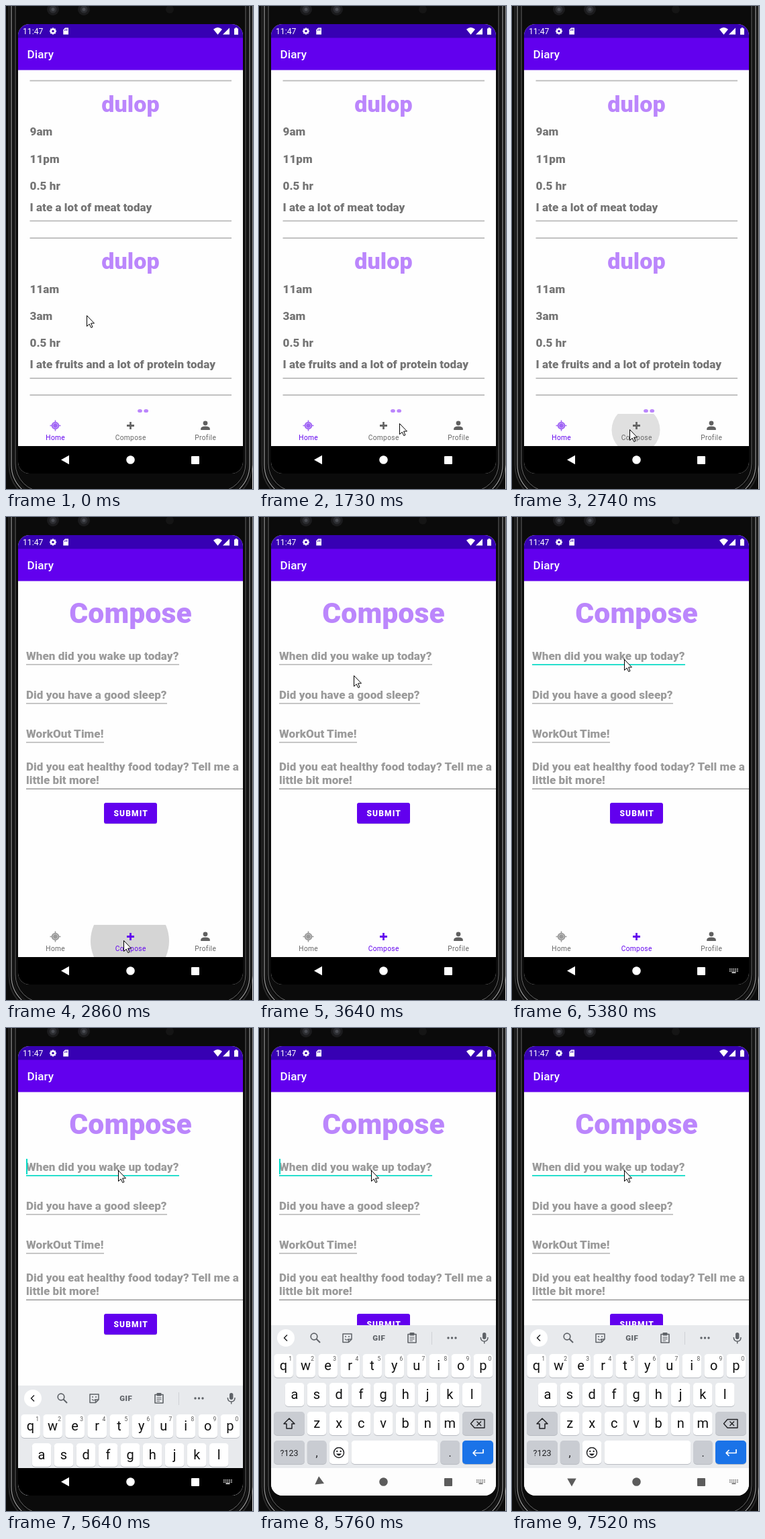
Recreate the animation shown at these times as an HTML page. Size 368 by 720 pixels, loop 8000 ms.

```html
<!DOCTYPE html>
<html lang="en">
<head>
<meta charset="utf-8">
<title>Diary app</title>
<style>
html, body { margin: 0; width: 368px; height: 720px; overflow: hidden; background: #000; }
svg { display: block; font-family: Roboto, sans-serif; }
.bold { font-weight: 900; letter-spacing: .002em; }
.mid { text-anchor: middle; }
.line { fill: none; stroke-linejoin: round; }
</style>
</head>
<body>
<svg id="stage" width="368" height="720" viewBox="0 0 368 720"></svg>
<script>
const LOOP = 8000;
const PURPLE = '#6200ee', LILAC = '#bb86fc', TEAL = '#03dac5', INK = '#5f6368';
const BODY = 17.05; // 20sp at this screen's density

const rect = (x, y, w, h, fill, r = 0, extra = '') =>
  `<rect x="${x}" y="${y}" width="${w}" height="${h}" rx="${r}" fill="${fill}" ${extra}/>`;
const disc = (x, y, r, fill, extra = '') => `<circle cx="${x}" cy="${y}" r="${r}" fill="${fill}" ${extra}/>`;
const text = (s, x, y, size, fill, cls = '', extra = '') =>
  `<text x="${x}" y="${y}" font-size="${size}" fill="${fill}" class="${cls}" ${extra}>${s}</text>`;
const path = (d, fill, extra = '') => `<path d="${d}" fill="${fill}" ${extra}/>`;
const line = (d, color, width = 1.5) => `<path d="${d}" class="line" stroke="${color}" stroke-width="${width}"/>`;
const group = (id, body, extra = '') => `<g id="${id}" ${extra}>${body}</g>`;

function phone() {
  const ring = (x, bottom, r, color, width) =>
    rect(x, -90, 371 - 2 * x, bottom + 90, 'none', r, `stroke="${color}" stroke-width="${width}"`);
  const lens = x => disc(x, 5, 9, '#1b1b1d') + disc(x, 5, 5.5, '#2d2e32') + disc(x, 5, 2.5, '#4a4c52');
  return rect(0, 0, 368, 720, '#0b0b0b') + rect(367, 0, 1, 720, '#ddd') +
    ring(4.5, 740, 56, '#2b2b2b', 2) + ring(8, 734, 50, '#999', 1.2) +
    ring(11, 730, 46, '#161616', 3) + ring(14, 724, 42, '#666', 1) +
    lens(70) + lens(116) + disc(244, 5, 6, '#151515');
}

function statusBar() {
  const teeth = [0, 45, 90, 135].map(a =>
    rect(68.8, 32.5, 2.4, 10, '#fff', .5, `transform="rotate(${a} 70 37.5)"`)).join('');
  return rect(18, 27, 335, 21, '#3700b3') + rect(18, 47.5, 335, 48, PURPLE) +
    text('11:47', 25, 42, 12.2, '#fff') +
    teeth + disc(70, 37.5, 3.8, '#fff') + disc(70, 37.5, 1.7, '#3700b3') +
    path('M88 32.5H93V42.5H85.3V35.5Z', '#fff') +
    path('M87.3 35v2M89.2 34v3M91 34v3', 'none', 'stroke="#3700b3" stroke-width=".8"') +
    path('M309 34.7Q315.5 29.5 322 34.7L315.5 42.7Z', '#fff') +
    path('M323 42.5L333 32.5V42.5Z', '#fff') +
    path('M340 33.5H341.6V32.3H344.4V33.5H346V42.7H340Z', '#fff') +
    text('Diary', 31.5, 78, BODY, '#fff', '', 'font-weight="500" letter-spacing=".1"');
}

function entry(top, rows) {
  const at = [82.5, 123, 163, 195];
  return rect(35.5, top, 300.5, 1.8, '#bbb') + rect(35.5, top + 209, 300.5, 1.8, '#bbb') +
    text('dulop', 185.5, top + 47, 34.1, LILAC, 'bold mid') +
    rows.map((s, i) => text(s, 35.5, top + at[i], BODY, '#757575', 'bold')).join('');
}

function home() {
  return entry(110.5, ['9am', '11pm', '0.5 hr', 'I ate a lot of meat today']) +
    entry(345, ['11am', '3am', '0.5 hr', 'I ate fruits and a lot of protein today']) +
    rect(35.5, 579, 300.5, 1.8, '#bbb') +
    [199.5, 208.7].map(x => `<ellipse cx="${x}" cy="603.5" rx="3.4" ry="2.6" fill="${LILAC}"/>`).join('');
}

function compose() {
  const hint = (s, y, id = '') => text(s, 30, y, BODY, '#9b9b9b', 'bold', id && `id="${id}"`);
  return text('Compose', 185.5, 157.5, 42.7, LILAC, 'bold mid') +
    hint('When did you wake up today?', 213, 'hint') +
    text('', 30, 213, BODY, '#222', 'bold', 'id="typed"') +
    hint('Did you have a good sleep?', 271) + hint('WorkOut Time!', 329) +
    hint('Did you eat healthy food today? Tell me a', 378) + hint('little bit more!', 398) +
    rect(30, 219.3, 228, 1.3, '#aaa', 0, 'id="underline"') + rect(30, 277.3, 210, 1.3, '#aaa') +
    rect(30, 335.3, 116, 1.3, '#aaa') + rect(30, 404.7, 323, 1.1, '#777') +
    rect(146, 427, 79, 31, '#ddd', 3) + rect(146, 426, 79, 31, PURPLE, 3) +
    text('SUBMIT', 186.2, 446, 12, '#fff', 'mid', 'font-weight="900" letter-spacing="1.1"') +
    rect(30, 195, 2, 23, TEAL, 0, 'id="caret"');
}

function tabs() {
  const label = (s, x) => text(s, x, 647.2, 10.2, 'currentColor', 'mid', 'letter-spacing=".36"');
  const target = '<g id="target">' + disc(73.5, 625.5, 5.8, 'currentColor') +
    line('M73.5 617.5V633.5M65.5 625.5H81.5', 'currentColor', 1.6) +
    disc(73.5, 625.5, 3.7, 'none', 'stroke="#fff" stroke-width=".7" stroke-opacity=".6"') + '</g>';
  return group('tabHome', target + label('Home', 73.7)) +
    group('tabCompose', line('M185.5 620V631M180 625.5H191', 'currentColor', 2.8) + label('Compose', 185.7)) +
    group('tabProfile', disc(297, 621.8, 3.4, '#606060') +
      path('M290.2 632V630Q290.5 626.5 297 626.5T303.8 630V632Z', '#606060') + label('Profile', 297.2), 'color="#666"');
}

function keyboard() {
  const key = (x, y, w, fill = '#fff') => rect(x, y + 1, w, 35, '#b9bcc2', 5) + rect(x, y, w, 35, fill, 5);
  const row = (letters, x, y, digits = '') => [...letters].map((c, i) => {
    const left = x + i * 33.03;
    return key(left, y, 28.7) + text(c, left + 14.3, y + 24, 20, '#111', 'mid') +
      (digits ? text(digits[i], left + 24.5, y + 10, 8.5, '#555', 'mid') : '');
  }).join('');
  const GREY = '#c9ccd2', DARK = '#202124';
  const tools = disc(40, 462, 13, '#fff') + line('M42 457.5L37.5 462L42 466.5', DARK) +
    disc(82, 460, 4.8, 'none', `stroke="${INK}" stroke-width="1.7"`) + line('M85.5 463.5L91 469', INK, 2) +
    line('M125 456H138V464L133.5 468.5H125ZM138 464H133.5V468.5', INK) +
    disc(129, 460, 1, INK) + disc(134, 460, 1, INK) + line('M128 463.5Q131 466.5 133.5 463.5', INK, 1.2) +
    text('GIF', 178.7, 466, 11.5, INK, 'mid', 'font-weight="900" letter-spacing=".5"') +
    line('M222 456.5H234V469H222Z', INK, 1.6) + rect(224.5, 454, 7, 4.5, INK, 1) +
    line('M224.5 461.2H231.5M224.5 463.7H231.5M224.5 466.2H229', INK, 1) +
    rect(257, 453, 1, 19, '#cfd1d5') + [282, 287.5, 293].map(x => disc(x, 462, 1.7, INK)).join('') +
    rect(333, 454, 5.4, 10, INK, 2.7) + line('M330.3 461Q330.3 467 335.7 467T341 461M335.7 467V470.5', INK);
  const face = disc(119, 633, 7.5, 'none', `stroke="${DARK}" stroke-width="1.5"`) +
    disc(116.3, 631, 1.2, DARK) + disc(121.7, 631, 1.2, DARK) + path('M115 634.5H123Q119 640.5 115 634.5Z', DARK);
  return rect(18, 443, 335, 215, '#e8eaed') + tools +
    row('qwertyuiop', 22.2, 486, '1234567890') + row('asdfghjkl', 38.7, 529) + row('zxcvbnm', 71.8, 572) +
    key(22, 572, 46, GREY) + line('M45 582L53 590H49V597H41V590H37Z', DARK) +
    key(303, 572, 46, GREY) +
    line('M321 583.5H336V596H321L315.5 589.7ZM324.5 586.5L331 593M331 586.5L324.5 593', DARK, 1.4) +
    key(22, 615, 46, GREY) + text('?123', 45, 637.5, 12.5, DARK, 'mid') +
    key(71.8, 615, 28.7, GREY) + text(',', 86, 639, 16, DARK, 'mid') +
    key(104.8, 615, 28.7) + face + key(137.5, 615, 129) +
    key(270.3, 615, 28.7, GREY) + text('.', 284.5, 639, 16, DARK, 'mid') +
    key(303, 615, 46, '#1a73e8') + line('M334 628V633.5H319M323.5 629L319 633.5L323.5 638', '#fff', 1.7);
}

function systemBar() {
  const dots = [674, 676.7].map(y =>
    `<path d="M324 ${y}H337" stroke="currentColor" stroke-width="1.6" stroke-dasharray="1.6 1.2"/>`).join('');
  return rect(18, 656, 335, 41, '#000', 0, 'id="barFill"') +
    group('buttons', path('M82 676.5L94 669.8V683.2Z', 'currentColor', 'id="back"') +
      disc(185.5, 676.5, 6.3, 'currentColor') + rect(276, 671, 12, 12, 'currentColor', 1) +
      group('keysIcon', dots + line('M327.5 679.3H333.5', 'currentColor', 1.4)));
}

document.getElementById('stage').innerHTML = `<defs>
  <clipPath id="screen"><rect x="18" y="27" width="335" height="670" rx="17"/></clipPath>
  <clipPath id="tabClip"><rect x="18" y="608" width="335" height="48"/></clipPath></defs>` +
  phone() + `<g clip-path="url(#screen)">` + rect(18, 27, 335, 670, '#fefefe') + statusBar() +
  group('home', home()) + group('compose', compose()) +
  rect(18, 608, 335, 48, '#fefefe') +
  disc(184.5, 632, 58.5, '#d5d5d5', 'id="ripple" clip-path="url(#tabClip)"') +
  tabs() + group('keyboard', keyboard()) + systemBar() + '</g>' +
  path('M.5 .5V16.5L4.2 13.1L6.8 18.5L9 17.5L6.6 12H11.5Z', '#fff', 'id="cursor" stroke="#000" stroke-width="1"');

const $ = id => document.getElementById(id);
const set = (id, attrs) => { for (const k in attrs) $(id).setAttribute(k, attrs[k]); };
const show = (id, on) => set(id, { visibility: on ? 'visible' : 'hidden' });
// Last row of [time, ...values] that has started.
const held = (rows, t) => rows.findLast(r => r[0] <= t).slice(1);

const MOVES = [[0, 120, 461], [1050, 121, 461], [1190, 126, 523], [1340, 152, 565], [1460, 188, 604],
  [1580, 210, 623], [1730, 209, 622], [2160, 190, 627], [2280, 176, 631], [2430, 175, 631],
  [3370, 106, 320], [3490, 121, 251], [3640, 141, 236], [3790, 166, 212], [3940, 167, 212]];
const RIPPLE = [[0, 0, 0], [2740, 36, .7], [2860, 58.5, 1], [2980, 58.5, .5], [3100, 0, 0]];
const CARET = [[0, 0], [4360, 1], [5120, 0], [5640, 1], [6550, 0], [6840, 1], [7520, 0]];
const TYPED = [[0, ''], [5880, 'h'], [6000, 'hi'], [6840, 'h'], [6960, '']];
const SLIDE = [[0, 215], [5640, 90], [5760, 0]];
const TURN = [[0, 0], [5760, -36], [5880, -80], [6000, -90]];

function draw(t) {
  const onCompose = t >= 2860, light = t >= 5760, focused = t >= 4360;
  const [x, y] = held(MOVES, t), [r, opacity] = held(RIPPLE, t);
  const [typed] = held(TYPED, t), [slide] = held(SLIDE, t);
  set('cursor', { transform: `translate(${x} ${y})` });
  set('ripple', { r, opacity });
  show('home', !onCompose);
  $('compose').style.display = onCompose ? '' : 'none';
  set('tabHome', { color: onCompose ? '#666' : PURPLE });
  set('target', { opacity: onCompose ? .65 : .6 });
  set('tabCompose', { color: onCompose ? PURPLE : '#666' });

  set('underline', { fill: focused ? TEAL : '#aaa', height: focused ? 1.7 : 1.3 });
  show('hint', !typed);
  $('typed').textContent = typed;
  show('caret', held(CARET, t)[0]);
  set('caret', { x: typed ? Math.round(30.4 + $('typed').getComputedTextLength()) : 30 });

  show('keyboard', slide < 215);
  set('keyboard', { transform: `translate(0 ${slide})` });
  set('barFill', { fill: light ? '#fdfdfd' : '#000' });
  set('buttons', { color: light ? '#5c5c5c' : '#fff' });
  set('back', { transform: `rotate(${held(TURN, t)[0]} 89 676.5)` });
  show('keysIcon', t >= 5380);
}

function tick() {
  draw(performance.now() % LOOP);
  requestAnimationFrame(tick);
}
tick();
</script>
</body>
</html>
```
